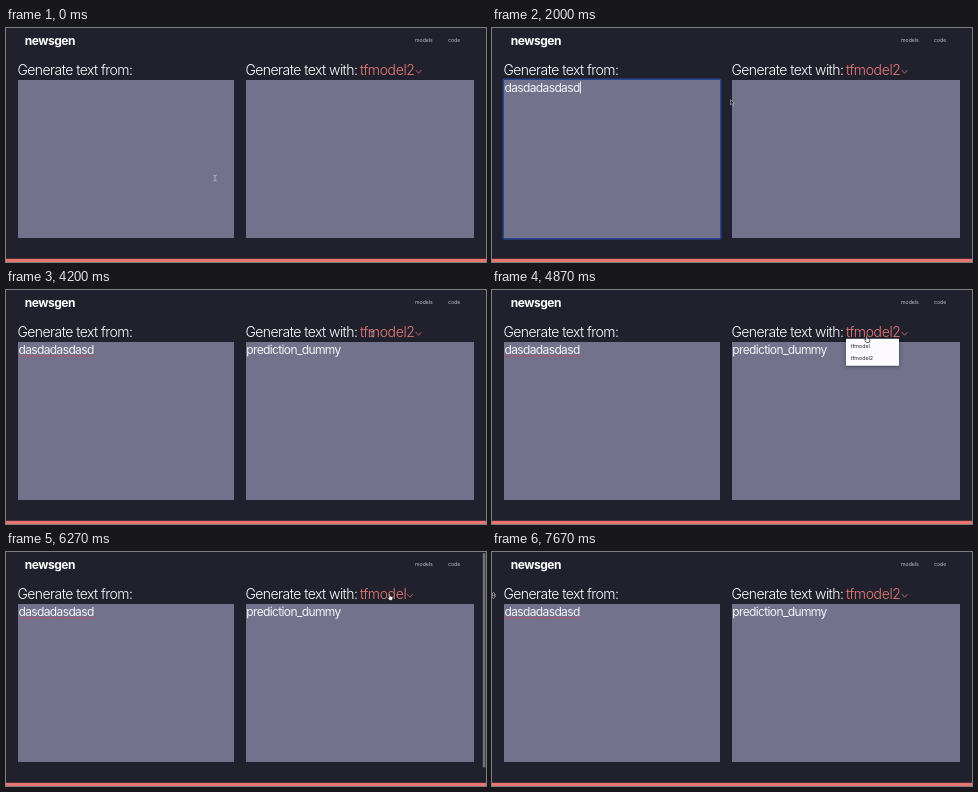
Recreate the animation shown at these times as an HTML page. Size 480 px wide and 234 px high, loop 8 s.

```html
<!DOCTYPE html>
<html lang="en">
<head>
<meta charset="utf-8">
<title>newsgen</title>
<style>
  html, body { margin: 0; width: 100%; height: 100%; overflow: hidden; background: #21212e; }
  svg { display: block; width: 100%; height: 100%; font-family: Inter, Roboto, sans-serif; fill: #fff; }
  text { white-space: pre; }
  .logo { font-size: 12px; font-weight: 700; letter-spacing: -.5px; }
  .nav { font-size: 5.2px; fill: #c2c2ca; }
  .head { font-size: 14px; font-weight: 300; letter-spacing: -.55px; }
  .body { font-size: 12px; font-weight: 400; letter-spacing: -.63px; fill: #f4f4f7; }
  .item { font-size: 5.3px; fill: #22222c; }
  .box { fill: #72728d; }
  .accent { fill: #ed7b77; letter-spacing: -.37px; }
  .menu { filter: drop-shadow(0 1px 2px #0006); }
  .line { fill: none; stroke-linecap: round; stroke-linejoin: round; }
</style>
</head>
<body>
<svg viewBox="0 0 480 234">
  <rect width="480" height="234" fill="#21212e"/>
  <rect y="230.8" width="480" height="3.2" fill="#ea756e"/>
  <text class="logo" x="18.8" y="17.3">newsgen</text>
  <text class="nav" x="409" y="14">models</text>
  <text class="nav" x="442" y="14">code</text>

  <text class="head" x="11.4" y="47">Generate text from:</text>
  <text class="head" x="239.4" y="47">Generate text with:</text>
  <text class="head accent" id="model" x="353.9" y="47"></text>
  <path class="line" id="chevron" d="M0 0l2.6 3 2.6-3" stroke="#d0706e" stroke-width=".8"/>

  <rect id="ring" x="11.3" y="51.3" width="217.4" height="159.4" rx=".8" fill="none" stroke="#28468f" stroke-width="1.4"/>
  <rect class="box" x="12" y="52" width="216" height="158"/>
  <rect class="box" x="240" y="52" width="228" height="158"/>
  <text class="body" id="typed" x="12.5" y="63.5"></text>
  <rect id="caret" y="53.5" width=".8" height="12"/>
  <line id="spelling" x1="13" y1="66" x2="87" y2="66" stroke="#c6485c" stroke-width="1.2" stroke-dasharray="1.4 .5"/>
  <text class="body" id="result" x="240.3" y="63.5">prediction_dummy</text>

  <g class="menu" id="menu">
    <rect x="354" y="48.7" width="53" height="27" rx=".6" fill="#fcfafd"/>
    <rect id="hover" x="354" width="53" height="12.2" fill="#e9776f"/>
    <text class="item" x="358.8" y="58">tfmodel</text>
    <text class="item" x="358.8" y="70">tfmodel2</text>
  </g>
  <rect id="scrollbar" x="476.8" y="1" width="2.6" height="214.5" rx="1.3" fill="#72727e"/>

  <g id="cursor">
    <path class="line" data-kind="beam" transform="scale(.85)" d="M-1.7-3.4Q0-3.4 0-2.4V2.4Q0 3.4-1.7 3.4M1.7-3.4Q0-3.4 0-2.4M0 2.4Q0 3.4 1.7 3.4" stroke="#c6c6d0" stroke-width=".8"/>
    <path data-kind="arrow" transform="scale(.85)" d="M0 0V6L1.4 4.8 2.4 7 3.4 6.5 2.5 4.4H4.4Z" fill="#17171e" stroke="#e4e4e8" stroke-width=".6"/>
    <path data-kind="hand" d="M-1-3.2Q-.3-4 .2-3.1V-.9L2.6-.2Q3.1 0 2.9 1L2.3 3.3H-.6L-2.5.7Q-2.4-.2-1 .6Z" fill="#fff" stroke="#22222a" stroke-width=".7"/>
    <path data-kind="resize" d="M0-3.2L2-.6H.7V.6H2L0 3.2-2 .6H-.7V-.6H-2Z" fill="#17171e" stroke="#d8d8de" stroke-width=".6"/>
  </g>
</svg>
<script>
const LOOP = 8000, RATE = 15;
const $ = id => document.getElementById(id);
const WORD = "dasdadasdasd";
const keyTimes = [200, 270, 400, 530, 730, 930, 1130, 1330, 1400, 1530, 1600, 1730];

// time, x, y, kind
const path = [
  [0, 209, 150, "beam"], [730, 209, 150, "beam"], [1000, 214, 147, "beam"],
  [1270, 221.5, 146, "beam"], [1400, 231, 139, "arrow"], [1530, 245, 126, "arrow"],
  [1730, 246, 100, "arrow"], [2130, 235, 58, "arrow"], [2400, 234, 57, "arrow"],
  [2730, 228, 46, "arrow"], [3530, 228, 46, "arrow"], [3730, 262, 34, "arrow"],
  [3930, 330, 40, "beam"], [4200, 366, 44, "beam"], [4400, 366, 44, "beam"],
  [4530, 374, 45, "hand"], [4800, 375, 46, "hand"], [5070, 375, 58, "hand"],
  [5270, 375, 62, "hand"], [5470, 375, 62, "hand"], [5670, 373, 54, "arrow"],
  [5870, 373, 54, "arrow"], [6000, 384, 45, "hand"], [6400, 384, 45, "hand"],
  [6600, 377, 61, "hand"], [6730, 375, 72, "hand"], [7070, 375, 72, "hand"],
  [7130, 340, 70, "beam"], [7330, 55, 56, "beam"], [7400, 55, 56, "beam"],
  [7470, 34, 51, "beam"], [7600, 8, 45, "arrow"], [7670, 1.5, 43.5, "resize"]
];
const models = [[0, "tfmodel2"], [5400, "tfmodel"], [7130, "tfmodel2"]];
// hovered row: 0 none, 1 first, 2 second
const hovers = [[0, 0], [5000, 1], [5400, 0], [6500, 1], [6670, 2], [7130, 0]];

const between = (t, a, b) => t >= a && t < b;
const show = (id, on) => $(id).style.display = on ? "" : "none";
const lastIndex = (table, t) => table.findLastIndex(row => row[0] <= t);
const valueAt = (table, t) => table[lastIndex(table, t)][1];

function moveCursor(t) {
  const i = lastIndex(path, t), a = path[i], b = path[i + 1] || a;
  const k = a === b ? 0 : (t - a[0]) / (b[0] - a[0]);
  const mix = n => a[n] + (b[n] - a[n]) * k;
  $("cursor").setAttribute("transform", `translate(${mix(1)} ${mix(2)})`);
  for (const shape of $("cursor").children)
    shape.style.display = shape.dataset.kind === a[3] ? "" : "none";
}

function render(t) {
  const count = keyTimes.filter(k => k <= t).length;
  $("typed").textContent = WORD.slice(0, count);
  const end = 12.5 + (count ? $("typed").getComputedTextLength() : 0);
  $("caret").setAttribute("x", end + .4);
  show("caret", between(t, 70, 2130));
  show("ring", between(t, 70, 3070));
  show("spelling", t >= 3070);
  $("spelling").setAttribute("x2", end);
  show("result", t >= 3200);

  const model = valueAt(models, t);
  $("model").textContent = model;
  $("chevron").setAttribute("transform", `translate(${model === "tfmodel" ? 401.3 : 410} 42.3)`);

  show("menu", between(t, 4670, 5470) || between(t, 6330, 7130));
  const row = valueAt(hovers, t);
  show("hover", row);
  $("hover").setAttribute("y", row === 2 ? 62 : 49.8);
  show("scrollbar", between(t, 5530, 7270));
  moveCursor(t);
}

function frame() {
  const t = performance.now() % LOOP;
  render(Math.round(Math.floor((t + 5) * RATE / 1000) * 100 / RATE) * 10);
  requestAnimationFrame(frame);
}
frame();
</script>
</body>
</html>
```
